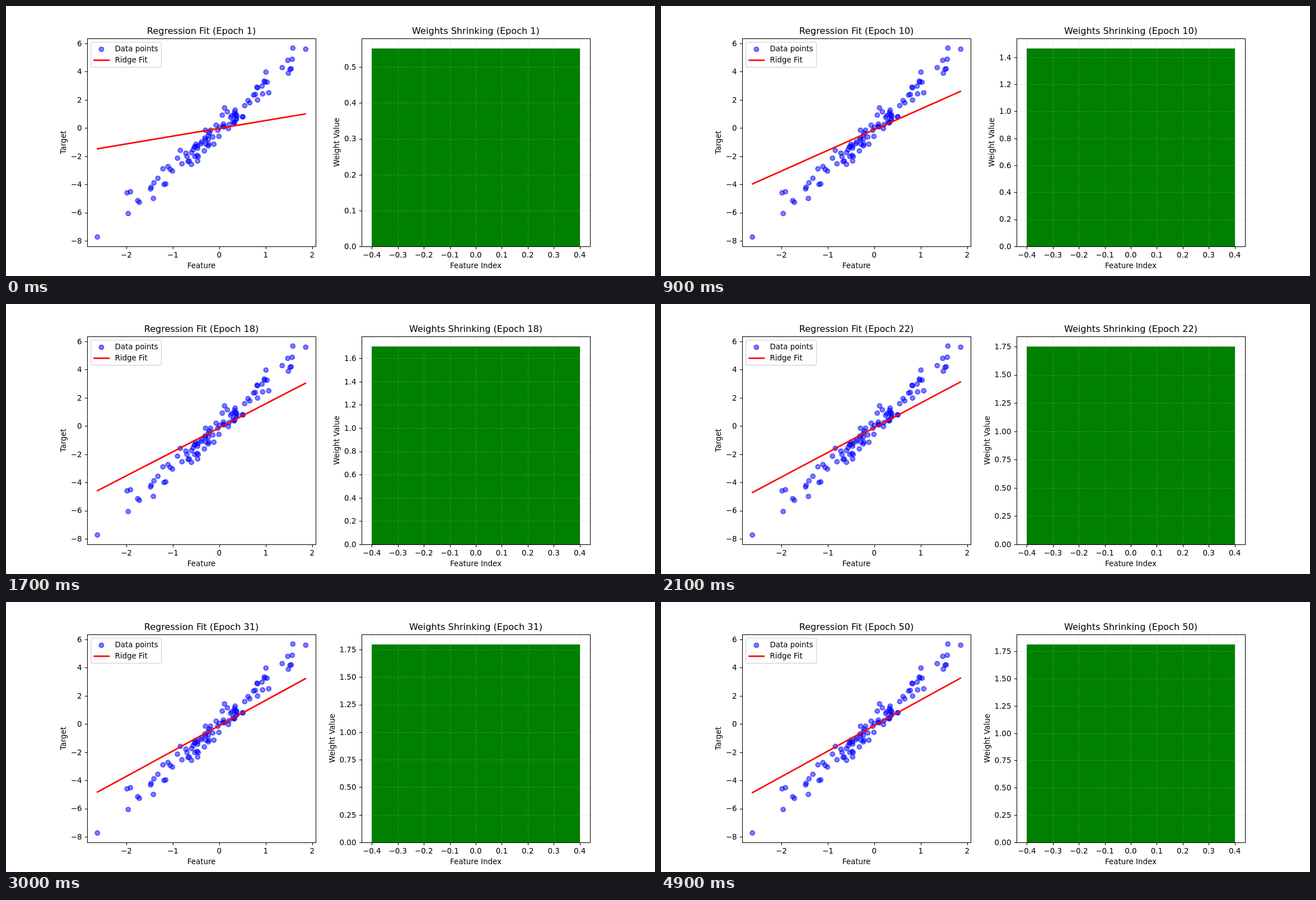
Animation of 1159 by 483 pixels, one loop 5 s. Source, as an HTML page:

```html
<!DOCTYPE html>
<html lang="en">
<head>
<meta charset="utf-8">
<title>Ridge regression training</title>
<style>
  html, body { margin: 0; width: 100%; height: 100%; overflow: hidden; background: #fff; }
  svg { display: block; }
  text { font: 13.41px "DejaVu Sans", sans-serif; fill: #000; }
  .title { font-size: 16.1px; }
  .mid { text-anchor: middle; }
  .end { text-anchor: end; }
  .axis { fill: none; stroke: #000; stroke-width: 1.07; }
  .grid { stroke: #b0b0b0; stroke-opacity: .3; stroke-width: 1.07; stroke-dasharray: 3.97 1.72; }
  .dot { fill: #00f; fill-opacity: .5; stroke: #00f; stroke-opacity: .5; stroke-width: 2.01; }
  .fit { stroke: #f00; stroke-width: 2.68; stroke-linecap: square; }
</style>
</head>
<body>
<svg id="stage" width="1159" height="483" viewBox="0 0 1159 483"></svg>
<script>
const EPOCHS = 50, STEP_MS = 100;
const TOP = 57.96, BOTTOM = 429.87, WIDTH = 408.3;
const LEFT_X = 144.875, RIGHT_X = 634.83;
const TICK = 4.69, LABEL_GAP = 9.39, HALF_DIGIT = 4.9;

const stage = document.getElementById('stage');
const snap = v => Math.round(v) + 0.5;
const mean = list => list.reduce((a, b) => a + b, 0) / list.length;
const format = (v, digits) => v.toFixed(digits).replace('-', '\u2212');

function add(parent, tag, attrs, content) {
  const el = document.createElementNS('http://www.w3.org/2000/svg', tag);
  for (const key in attrs) el.setAttribute(key, attrs[key]);
  if (content !== undefined) el.textContent = content;
  parent.appendChild(el);
  return el;
}
const line = (parent, cls, x1, y1, x2, y2) =>
  add(parent, 'line', { class: cls, x1, y1, x2, y2 });
const label = (parent, cls, x, y, content) =>
  add(parent, 'text', { class: cls, x, y }, content);
const dot = (parent, x, y) => add(parent, 'circle', { class: 'dot', cx: x, cy: y, r: 4.02 });

// Mersenne Twister with polar-method normal deviates
function normalSource(seed) {
  const N = 624, M = 397, mt = [seed >>> 0];
  for (let i = 1; i < N; i++) {
    const p = mt[i - 1] ^ (mt[i - 1] >>> 30);
    mt[i] = (Math.imul(1812433253, p) + i) >>> 0;
  }
  let pos = N, spare = null;

  function word() {
    if (pos === N) {
      for (let i = 0; i < N; i++) {
        const y = (mt[i] & 0x80000000) | (mt[(i + 1) % N] & 0x7fffffff);
        mt[i] = (mt[(i + M) % N] ^ (y >>> 1) ^ (y & 1 ? 0x9908b0df : 0)) >>> 0;
      }
      pos = 0;
    }
    let y = mt[pos++];
    y ^= y >>> 11;
    y ^= (y << 7) & 0x9d2c5680;
    y ^= (y << 15) & 0xefc60000;
    y ^= y >>> 18;
    return y >>> 0;
  }

  function uniform() {
    const a = word() >>> 5, b = word() >>> 6;
    return (a * 67108864 + b) / 9007199254740992;
  }

  return function normal() {
    if (spare !== null) {
      const value = spare;
      spare = null;
      return value;
    }
    let u, v, r;
    do {
      u = 2 * uniform() - 1;
      v = 2 * uniform() - 1;
      r = u * u + v * v;
    } while (r >= 1 || r === 0);
    const f = Math.sqrt(-2 * Math.log(r) / r);
    spare = f * u;
    return f * v;
  };
}

// Noisy line y = 3x, then gradient descent with an L2 penalty
const normal = normalSource(42);
const xs = Array.from({ length: 100 }, normal);
const ys = xs.map(x => 3 * x + 0.5 * normal());

function train(rate, penalty) {
  let w = normal(), b = 0;
  const history = [];
  for (let i = 0; i < EPOCHS; i++) {
    const errors = xs.map((x, k) => w * x + b - ys[k]);
    const dw = mean(errors.map((e, k) => e * xs[k])) + penalty * w;
    const db = mean(errors);
    w -= rate * dw;
    b -= rate * db;
    history.push({ w, b });
  }
  return history;
}
const history = train(0.1, 0.5);

// Linear scale with a 5% margin on both sides
function scale(list, from, to) {
  const lo = Math.min(...list), hi = Math.max(...list), pad = (hi - lo) * 0.05;
  return v => from + (v - lo + pad) / (hi - lo + 2 * pad) * (to - from);
}
const px = scale(xs, LEFT_X, LEFT_X + WIDTH);
const py = scale(ys, BOTTOM, TOP);
const bx = scale([-0.4, 0.4], RIGHT_X, RIGHT_X + WIDTH);

function frame(x) {
  const left = snap(x), top = snap(TOP);
  add(stage, 'rect', {
    class: 'axis', x: left, y: top,
    width: snap(x + WIDTH) - left, height: snap(BOTTOM) - top
  });
}
function xTick(x, content) {
  const at = snap(x), y = snap(BOTTOM);
  line(stage, 'axis', at, y, at, y + TICK);
  label(stage, 'mid', x, 450.4, content);
}
function yTick(parent, axisX, y, content) {
  const at = snap(y), x = snap(axisX);
  line(parent, 'axis', x, at, x - TICK, at);
  label(parent, 'end', axisX - LABEL_GAP, y + HALF_DIGIT, content);
}
function sideLabel(content) {
  return add(stage, 'text', { class: 'mid' }, content);
}
const placeSide = (el, x) =>
  el.setAttribute('transform', `translate(${x} ${(TOP + BOTTOM) / 2}) rotate(-90)`);

// Left plot
const leftMid = LEFT_X + WIDTH / 2, rightMid = RIGHT_X + WIDTH / 2;
const NUDGE = 0.25;
xs.forEach((x, i) => dot(stage, Math.round(px(x)) + NUDGE, Math.round(py(ys[i])) + NUDGE));
const x0 = Math.min(...xs), x1 = Math.max(...xs);
const fit = line(stage, 'fit', px(x0), 0, px(x1), 0);
for (let v = -2; v <= 2; v++) xTick(px(v), format(v, 0));
for (let v = -8; v <= 6; v += 2) yTick(stage, LEFT_X, py(v), format(v, 0));
frame(LEFT_X);
label(stage, 'mid', leftMid, 469, 'Feature');
placeSide(sideLabel('Target'), 107);
const leftTitle = label(stage, 'title mid', leftMid, 50, '');

// Legend
add(stage, 'rect', {
  x: 151.6, y: 64.9, width: 126, height: 44.6, rx: 2.7,
  fill: '#fff', 'fill-opacity': 0.8,
  stroke: '#ccc', 'stroke-opacity': 0.8, 'stroke-width': 1.34
});
dot(stage, 170.4, 77.4);
line(stage, 'fit', 157.5, 97, 183.8, 97);
label(stage, '', 194.4, 80.6, 'Data points');
label(stage, '', 194.4, 100.6, 'Ridge Fit');

// Right plot
const barTop = Math.round(BOTTOM - (BOTTOM - TOP) / 1.05);
const barLeft = Math.round(bx(-0.4));
add(stage, 'rect', {
  x: barLeft, y: barTop, width: Math.round(bx(0.4)) - barLeft, height: 430 - barTop, fill: '#008000'
});
for (let i = -4; i <= 4; i++) {
  const x = bx(i / 10);
  line(stage, 'grid', snap(x), BOTTOM, snap(x), TOP);
  xTick(x, format(i / 10, 1));
}
const scaleGroup = add(stage, 'g', {});
frame(RIGHT_X);
label(stage, 'mid', rightMid, 469, 'Feature Index');
const weightLabel = sideLabel('Weight Value');
const rightTitle = label(stage, 'title mid', rightMid, 50, '');

function drawWeightScale(w) {
  const limit = 1.05 * w;
  const step = [0.1, 0.2, 0.25].find(s => s >= limit / 9);
  const digits = step === 0.25 ? 2 : 1;
  scaleGroup.replaceChildren();
  for (let i = 0; i * step <= limit; i++) {
    const y = BOTTOM - i * step / limit * (BOTTOM - TOP);
    line(scaleGroup, 'grid', RIGHT_X, snap(y), RIGHT_X + WIDTH, snap(y));
    yTick(scaleGroup, RIGHT_X, y, format(i * step, digits));
  }
  placeSide(weightLabel, digits === 2 ? 586.8 : 595.3);
}

let shown = -1;
function draw(time) {
  const i = Math.floor(time / STEP_MS) % EPOCHS;
  if (i === shown) return;
  shown = i;
  const { w, b } = history[i];
  fit.setAttribute('y1', py(w * x0 + b));
  fit.setAttribute('y2', py(w * x1 + b));
  leftTitle.textContent = `Regression Fit (Epoch ${i + 1})`;
  rightTitle.textContent = `Weights Shrinking (Epoch ${i + 1})`;
  drawWeightScale(w);
}

const start = performance.now();
function tick() {
  draw(performance.now() - start);
  requestAnimationFrame(tick);
}
tick();
</script>
</body>
</html>
```
